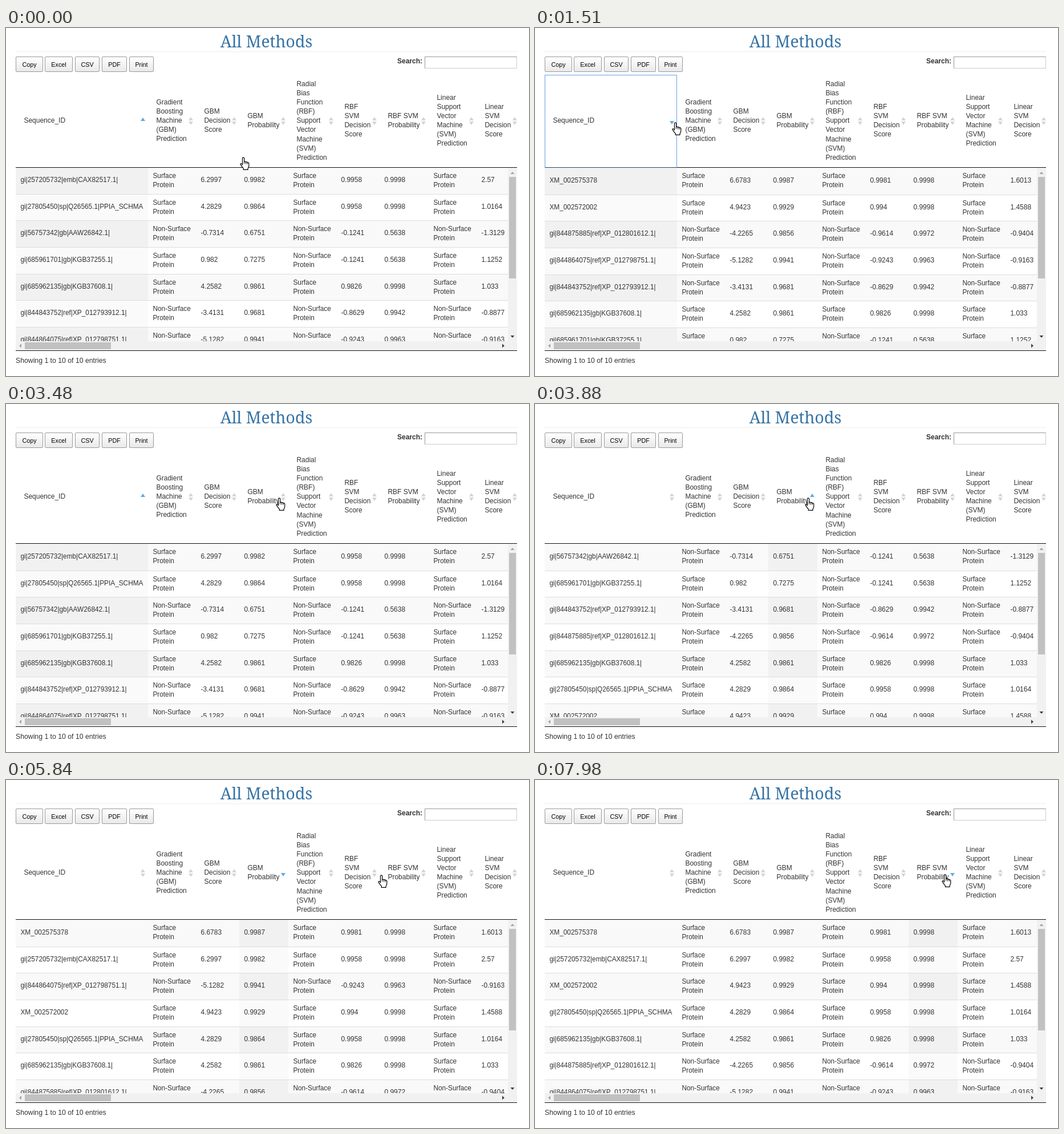
An HTML page that plays this animation: 917 px wide and 610 px high, repeating every 8 s.

```html
<!DOCTYPE html>
<html lang="en">
<head>
<meta charset="utf-8">
<title>All Methods</title>
<style>
html, body { margin: 0; width: 100%; height: 100%; overflow: hidden; background: #fff; }
#stage {
  position: relative; width: 917px; height: 610px; overflow: hidden;
  font: 12px/16px "Liberation Sans", Arial, sans-serif; color: #333;
}
#stage * { position: absolute; box-sizing: border-box; white-space: pre; }
h1 {
  left: 0; top: 3px; width: 913px; margin: 0; text-align: center; color: #3573a5;
  font: 28.4px/40px "Noto Serif", Georgia, serif;
}
.line { left: 17px; width: 879px; height: 1px; background: #111; }
.button {
  top: 50px; height: 27px; border: 1px solid #999; border-radius: 2px; color: #000;
  background: linear-gradient(#fff, #e9e9e9); font-size: 10.8px; line-height: 26px; text-align: center;
}
.search { left: 686px; top: 50px; font-weight: bold; }
.input {
  left: 734px; top: 50px; width: 162px; height: 21px;
  border: 1px solid; border-color: #999 #ccc #ccc #999;
}
.head { line-height: 16.1px; transform: translateY(-50%); }
.icon { top: 156px; width: 8px; height: 14px; overflow: visible; fill: #d5d5d5; }
.icon.asc, .icon.desc { fill: #66abdb; }
.icon.asc .down, .icon.desc .up { display: none; }
.icon.asc .up { transform: translateY(1px); }
.icon.desc .down { transform: translateY(-1px); }
#body { left: 17px; top: 245px; width: 863px; height: 304px; overflow: hidden; }
.stripe { left: 0; width: 863px; height: 48px; border-top: 1px solid #ddd; background: #fff; }
.stripe.odd { background: #f9f9f9; }
.stripe:first-child { border: 0; }
.mark { top: 0; bottom: 0; background: #fafafa; }
.odd .mark { background: #f1f1f1; }
.row { left: 0; width: 863px; height: 0; }
.pair { top: -16px; font-size: 11.85px; }
.single { top: -9px; }
.id { font-size: 11.85px; }
#focus { left: 17px; top: 82px; width: 232px; height: 163px; border: 1px solid #6a9fe6; border-bottom-color: #2c4468; }
.track { background: #f1f1f1; }
.thumb { background: #c1c1c1; }
#bars { left: 0; top: 0; }
.info { left: 17px; top: 575px; font-size: 12.25px; }
#hand { left: 0; top: 0; width: 17px; height: 24px; overflow: visible; }
</style>
</head>
<body>
<div id="stage">
  <h1>All Methods</h1>
  <div class="line" style="top:41px;background:#eee"></div>
  <span class="search">Search:</span><div class="input"></div>
  <div id="body"></div>
  <div class="track" style="left:880px;top:245px;width:16px;height:320px"></div>
  <div class="track" style="left:17px;top:549px;width:863px;height:16px"></div>
  <div class="thumb" style="left:882px;top:261px;width:12px;height:178px"></div>
  <div class="thumb" style="left:33px;top:551px;width:151px;height:12px"></div>
  <svg id="bars" width="917" height="610">
    <path fill="#a3a3a3" d="M884.5 256h7l-3.500-4zM27 553.500v7l-4-3.500z"/>
    <path fill="#404040" d="M884.500 539h7l-3.500 4zM870 553.500v7l4-3.500z"/>
  </svg>
  <div class="line" style="top:244px"></div>
  <div class="line" style="top:565px"></div>
  <div id="focus"></div>
  <span class="info">Showing 1 to 10 of 10 entries</span>
</div>
<script>
const stage = document.getElementById('stage');
const body = document.getElementById('body');
const focusRing = document.getElementById('focus');
const LOOP = 8000;

function add(parent, cls, left, text = '') {
  const node = document.createElement('div');
  node.className = cls;
  node.style.left = left + 'px';
  node.textContent = text;
  parent.append(node);
  return node;
}

[['Copy', 17, 48], ['Excel', 68, 49], ['CSV', 121, 43], ['PDF', 168, 44], ['Print', 216, 43]]
  .forEach(([label, x, width]) => add(stage, 'button', x, label).style.width = width + 'px');

const edges = [17, 249, 333, 409, 495, 579, 655, 741, 825, 901];
const heads = [
  'Sequence_ID',
  'Gradient\nBoosting\nMachine\n(GBM)\nPrediction',
  'GBM\nDecision\nScore',
  'GBM\nProbability',
  'Radial\nBias\nFunction\n(RBF)\nSupport\nVector\nMachine\n(SVM)\nPrediction',
  'RBF\nSVM\nDecision\nScore',
  'RBF SVM\nProbability',
  'Linear\nSupport\nVector\nMachine\n(SVM)\nPrediction',
  'Linear\nSVM\nDecision\nScore'
];
const icons = heads.map((text, c) => {
  add(stage, 'head', edges[c] + 14.4, text).style.top = '162px';
  stage.insertAdjacentHTML('beforeend',
    `<svg class="icon" style="left:${edges[c + 1] - 13}px">` +
    '<path class="up" d="M0 6h8L4 0z"/><path class="down" d="M0 8h8l-4 6z"/></svg>');
  return stage.lastElementChild;
});

const S = 'Surface\nProtein', N = 'Non-' + S;
const data = [
  ['gi|257205732|emb|CAX82517.1|', S, '6.2997', '0.9982', S, '0.9958', '0.9998', S, '2.57'],
  ['gi|27805450|sp|Q26565.1|PPIA_SCHMA', S, '4.2829', '0.9864', S, '0.9958', '0.9998', S, '1.0164'],
  ['gi|56757342|gb|AAW26842.1|', N, '-0.7314', '0.6751', N, '-0.1241', '0.5638', N, '-1.3129'],
  ['gi|685961701|gb|KGB37255.1|', S, '0.982', '0.7275', N, '-0.1241', '0.5638', S, '1.1252'],
  ['gi|685962135|gb|KGB37608.1|', S, '4.2582', '0.9861', S, '0.9826', '0.9998', S, '1.033'],
  ['gi|844843752|ref|XP_012793912.1|', N, '-3.4131', '0.9681', N, '-0.8629', '0.9942', N, '-0.8877'],
  ['gi|844864075|ref|XP_012798751.1|', N, '-5.1282', '0.9941', N, '-0.9243', '0.9963', N, '-0.9163'],
  ['gi|844875885|ref|XP_012801612.1|', N, '-4.2265', '0.9856', N, '-0.9614', '0.9972', N, '-0.9404'],
  ['XM_002572002', S, '4.9423', '0.9929', S, '0.994', '0.9998', S, '1.4588'],
  ['XM_002575378', S, '6.6783', '0.9987', S, '0.9981', '0.9998', S, '1.6013']
];

const stripes = data.slice(0, 7).map((_, k) => {
  const node = add(body, k % 2 ? 'stripe' : 'stripe odd', 0);
  return { node, mark: add(node, 'mark', 0) };
});
const rows = data.map(cells => {
  const node = add(body, 'row', 0);
  const singles = [];
  cells.forEach((text, c) => {
    const pair = text.includes('\n');
    const cell = add(node, pair ? 'pair' : c ? 'single' : 'single id', edges[c] - 8.600, text);
    if (!pair) singles.push(cell);
  });
  return { cells, node, singles };
});

// Each phase re-sorts the rows left by the one before, so ties keep their order.
const phases = [
  { at: 0, col: 0, dir: 1, nudge: 0 },
  { at: 1510, col: 0, dir: -1, focus: true },
  { at: 2070, col: 0, dir: -1 },
  { at: 2360, col: 0, dir: 1, focus: true },
  { at: 3480, col: 0, dir: 1 },
  { at: 3880, col: 3, dir: 1 },
  { at: 4740, col: 3, dir: -1 },
  { at: 6320, col: 6, dir: 1 },
  { at: 7510, col: 6, dir: -1 }
];
let order = rows;
for (const phase of phases) {
  const key = row => row.cells[phase.col].toLowerCase();
  order = phase.order = [...order].sort((a, b) =>
    phase.dir * ((key(a) > key(b)) - (key(a) < key(b))));
}

function showPhase({ col, dir, focus, order, nudge = 1 }) {
  const top = k => Math.round(46.6 * k - 0.8);
  focusRing.style.display = focus ? '' : 'none';
  icons.forEach((icon, c) =>
    icon.setAttribute('class', 'icon' + (c !== col ? '' : dir > 0 ? ' asc' : ' desc')));
  stripes.forEach(({ node, mark }, k) => {
    node.style.top = (k ? top(k) + nudge : 0) + 'px';
    mark.style.left = edges[col] - 17 + 'px';
    mark.style.width = edges[col + 1] - edges[col] + 'px';
  });
  order.forEach(({ node, singles }, k) => {
    node.style.top = top(k) + 23 + (k ? nudge : 0) + 'px';
    for (const cell of singles) cell.style.marginTop = (k ? 0 : nudge) + 'px';
  });
}

stage.insertAdjacentHTML('beforeend', `<svg id="hand">
  <path fill="#fff" stroke="#000" stroke-width="1.2" stroke-linejoin="round"
    d="M4.500 14V2.400a1.600 1.600 0 0 1 3.200 0V8.400q1.600-.9 2.900.5 1.500-.7 2.700.7 2.400-.3 2.500 2v4.200q0 2-1.700 4.200V22.300H6.300v-2.100Q3.200 16.500 1.200 13.400q-.6-1.800.9-1.900 1.200.1 2.400 2.500z"/>
  <path fill="none" stroke="#000" d="M7.700 8v4M10.600 9v3.500M13.300 9.700v3"/></svg>`);
const hand = document.getElementById('hand');

// Pointer moves: start, end, steps, then from, control and to points.
const moves = [
  [90, 560, 7, [410, 226], [160, 9], [240, 181]],
  [790, 1020, 4, [240, 181], [240, 173], [240, 165]],
  [2620, 3330, 10, [240, 165], [356, 174], [473, 164]],
  [5530, 5930, 6, [473, 164], [594, 170], [715, 163]],
  [7980, 7980, 1, [715, 163], [714, 164], [713, 165]]
];

function pointerAt(t) {
  const move = moves.filter(m => m[0] <= t).pop();
  if (!move) return moves[0][3];
  const [start, end, steps, a, b, c] = move;
  const gap = (end - start) / (steps - 1) || 1;
  const s = Math.min(steps, 1 + Math.floor((t - start) / gap + 1e-6)) / steps;
  const u = s * s * (3 - 2 * s), v = 1 - u;
  return [0, 1].map(i => Math.round(v * v * a[i] + 2 * u * v * b[i] + u * u * c[i]));
}

let shown;
function draw() {
  const t = performance.now() % LOOP;
  const phase = phases.filter(p => p.at <= t).pop();
  if (phase !== shown) showPhase(shown = phase);
  const [x, y] = pointerAt(t);
  hand.style.transform = `translate(${x}px, ${y}px)`;
  requestAnimationFrame(draw);
}
draw();
</script>
</body>
</html>
```
